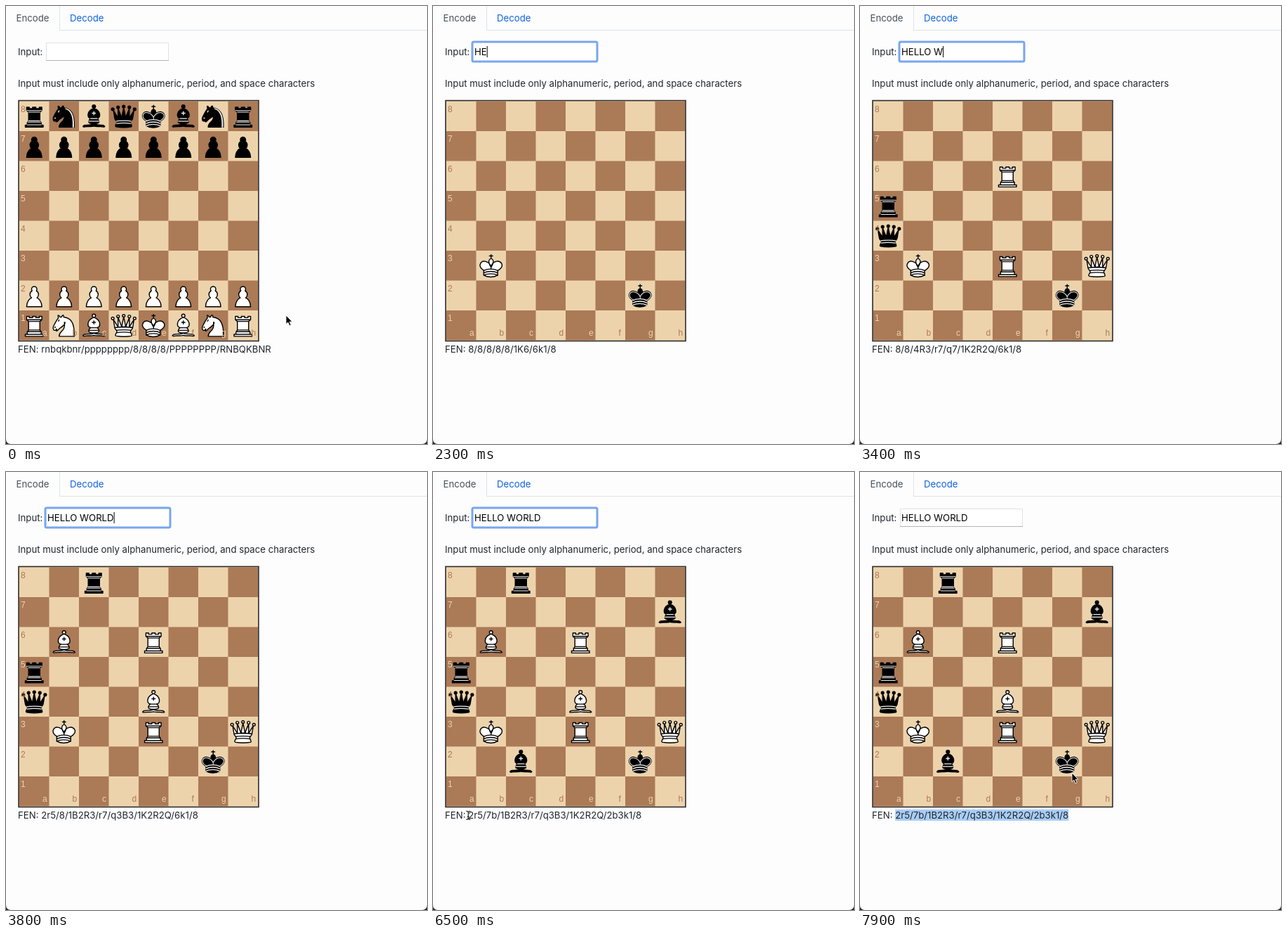
Recreate the animation shown at these times as an HTML page. Size 600 by 623 pixels, loop 8000 ms.

```html
<!DOCTYPE html>
<html lang="en">
<head>
<meta charset="utf-8">
<title>Encode</title>
<style>
  html, body { margin: 0; height: 100%; overflow: hidden; background: #fdfdfe; }
  svg { display: block; width: 100vw; height: 100vh; }
  text { font: 13.2px Inter, Roboto, sans-serif; fill: #212529; white-space: pre; }
  .label { font: 12px "Liberation Sans", sans-serif; }
  .piece { stroke: #000; stroke-width: 1.5; stroke-linecap: round; stroke-linejoin: round; }
</style>
</head>
<body>
<svg viewBox="0 0 600 623">
  <path d="M0 34.5H1M76 34.5H600M76.5 0V34" stroke="#dee2e6" fill="none"/>
  <text x="14.5" y="21.5" style="fill:#484f56">Encode</text>
  <text x="91" y="21.5" style="fill:#1062dc">Decode</text>
  <text x="17" y="70">Input:</text>
  <rect x="57.5" y="52.5" width="174" height="25" fill="#fff" stroke="#e2e2e4"/>
  <path d="M57 77.5H232" stroke="#b4b4b6"/>
  <rect id="ring" x="56" y="51" width="178" height="28" rx="2" fill="#fff" stroke="#78a6ee" stroke-width="3"/>
  <text id="typed" x="59" y="70" style="fill:#000"></text>
  <rect id="caret" y="57" width="1" height="16"/>
  <text x="17" y="114.5">Input must include only alphanumeric, period, and space characters</text>
  <rect x="18" y="134.5" width="342" height="342" fill="#edd3ac" stroke="#2c2c2c" stroke-width="1.6"/>
  <g id="squares"></g>
  <g id="pieces"></g>
  <g id="labels"></g>
  <rect id="mark" y="480" height="16" fill="#a8cdf8"/>
  <text id="fen" x="17" y="493"></text>
  <path d="M0 616Q0 623 7 623H0zM600 616Q600 623 593 623H600z" fill="#222"/>
  <path id="arrow" d="M0 0V12.6L2.9 10L5 14.8L7.2 13.8L5.1 9.2H9z" fill="#000" stroke="#fff" stroke-width=".9"/>
  <path id="beam" d="M-3-6Q0-6 0-4Q0-6 3-6M0-4V4M-3 6Q0 6 0 4Q0 6 3 6M-1.5 2H1.5" fill="none" stroke="#111" stroke-width="1.1"/>
</svg>
<script>
const $ = id => document.getElementById(id);
const LOOP = 8000, STEP = 100, CELL = 42.5, LEFT = 19, TOP = 135.5;
const LIGHT = '#edd3ac', DARK = '#ab7a57';

const dot = (x, y, r) => `M${x - r} ${y}a${r} ${r} 0 1 0 ${2 * r} 0a${r} ${r} 0 1 0 ${-2 * r} 0z`;

// body: outline; lines: inner strokes on both colours; light: strokes on black only; glow: light fill on black only
const SHAPES = {
  p: { body: 'M22.5 9c-2.21 0-4 1.79-4 4 0 .89.29 1.71.78 2.38C17.33 16.5 16 18.59 16 21c0 2.03.94 3.84 2.41 5.03-3 1.06-7.41 5.55-7.41 13.47h23c0-7.92-4.41-12.41-7.41-13.47 1.47-1.19 2.41-3 2.41-5.03 0-2.41-1.33-4.5-3.28-5.62.49-.67.78-1.49.78-2.38 0-2.21-1.79-4-4-4z' },
  r: {
    body: 'M9 39h27v-3H9zM12.5 32l1.5-2.5h17l1.5 2.5zM12 36v-4h21v4zM14 29.5v-13h17v13zM14 16.5L11 14h23l-3 2.5zM11 14V9h4v2h5V9h5v2h5V9h4v5z',
    light: 'M12 35.5h21M13 31.5h19M14 29.5h17M14 16.5h17M11 14h23'
  },
  n: {
    body: 'M22 10c10.5 1 16.5 8 16 29H15c0-9 10-6.5 8-21M24 18c.38 2.91-5.55 7.37-8 9-3 2-2.82 4.34-5 4-1.04-.94 1.41-3.04 0-3-1 0 .19 1.23-1 2-1 0-4 1-4-4 0-2 6-12 6-12s1.89-1.9 2-3.5c-.73-1-.5-2-.5-3 1-1 3 2.5 3 2.5h2s.78-2 2.5-3c1 0 1 3 1 3',
    lines: dot(9, 25.5, .4) + 'M15 14.5l-1 1.8',
    glow: 'M24.55 10.4l-.45 1.45.5.15c3.15 1 5.65 2.49 7.9 6.75S35.75 29.06 35.25 39l-.05.5h2.25l.05-.5c.5-10.06-.88-16.85-3.25-21.34-2.37-4.49-5.79-6.64-9.19-7.16z'
  },
  b: {
    body: 'M9 36c3.39-.97 10.11.43 13.5-2 3.39 2.43 10.11 1.03 13.5 2 0 0 1.65.54 3 2-.68.97-1.65.99-3 .5-3.39-.97-10.11.46-13.5-1-3.39 1.46-10.11.03-13.5 1-1.35.49-2.32.47-3-.5 1.35-1.94 3-2 3-2zM15 32c2.5 2.5 12.5 2.5 15 0 .5-1.5 0-2 0-2 0-2.5-2.5-4-2.5-4 5.5-1.5 6-11.5-5-15.5-11 4-10.5 14-5 15.5 0 0-2.5 1.5-2.5 4 0 0-.5.5 0 2z' + dot(22.5, 8, 2.5),
    lines: 'M17.5 26h10M15 30h15m-7.5-14.5v5M20 18h5'
  },
  q: {
    body: 'M9 26c8.5-1.5 21-1.5 27 0l2-12-7 11V11l-5.5 13.5-3-15-3 15-5.5-14V25L7 14zM9 26c0 2 1.5 2 2.5 4 1 1.5 1 1 .5 3.5-1.5 1-1.5 2.5-1.5 2.5-1.5 1.5.5 2.5.5 2.5 6.5 1 16.5 1 23 0 0 0 1.5-1 0-2.5 0 0 .5-1.5-1-2.5-.5-2.5-.5-2 .5-3.5 1-2 2.5-2 2.5-4-8.5-1.5-18.5-1.5-27 0z'
      + dot(6, 12, 2) + dot(14, 9, 2) + dot(22.5, 8, 2) + dot(31, 9, 2) + dot(39, 12, 2),
    lines: 'M11.5 30c3.5-1 18.5-1 22 0M12 33.5c6-1 15-1 21 0'
  },
  k: {
    body: 'M22.5 11.6V6M20 8h5M22.5 25s4.5-7.5 3-10.5c0 0-1-2.5-3-2.5s-3 2.5-3 2.5c-1.5 3 3 10.5 3 10.5M11.5 37c5.5 3.5 15.5 3.5 21 0v-7s9-4.5 6-10.5c-4-6.5-13.5-3.5-16 4V27v-3.5c-3.5-7.5-13-10.5-16-4-3 6 5 10 5 10z',
    lines: 'M11.5 30c5.5-3 15.5-3 21 0m-21 3.5c5.5-3 15.5-3 21 0m-21 3.5c5.5-3 15.5-3 21 0',
    light: 'M32 29.5s8.5-4 6-9.65C34.15 14 25 18 22.5 24.5v2.1-2.1C20 18 9.9 14 7 19.85c-2.5 5.65 4.85 9 4.85 9'
  }
};

const START = 'rnbqkbnr/pppppppp/8/8/8/8/PPPPPPPP/RNBQKBNR';
const PLACED = 'Kb3 kg2 Qh3 qa4 Re3 Re6 ra5 rc8 Be4 Bb6 bh7 bc2'.split(' ');
const TEXT = 'HELLO WORLD';
const KEYS = [1900, 2200, 2500, 2800, 2900, 3200, 3300, 3500, 3600, 3700, 3800];
const FOCUS = 1500, BLUR = 6600;

// time, x, y of the pointer
const PATH = [
  [0, 399, 440], [100, 399, 440], [900, 112, 78], [1100, 108, 76], [4700, 108, 76],
  [5400, 101, 452], [5700, 88, 492], [6000, 62, 501], [6300, 51, 489], [6600, 50, 488],
  [7300, 308, 490], [7500, 310, 491], [7700, 309, 489], [7899, 309, 489], [7900, 302, 428], [8000, 302, 428]
];

function pointer(t) {
  const i = PATH.findIndex(p => p[0] > t);
  const [a, b] = [PATH[i - 1], PATH[i]];
  const u = (t - a[0]) / (b[0] - a[0]), e = u * u * (3 - 2 * u);
  return [a[1] + (b[1] - a[1]) * e, a[2] + (b[2] - a[2]) * e];
}

function fenOf(list) {
  const at = Object.fromEntries(list.map(p => [p.slice(1), p[0]]));
  return [...'87654321'].map(rank =>
    [...'abcdefgh'].map(file => at[file + rank] || 1).join('').replace(/1+/g, run => run.length)
  ).join('/');
}

function drawPiece(c, col, row) {
  const s = SHAPES[c.toLowerCase()], black = c === c.toLowerCase();
  const ink = black ? '#eee' : '#000';
  const stroke = (d, w) => d ? `<path d="${d}" fill="none" stroke="${ink}" stroke-width="${w}"/>` : '';
  return `<g class="piece" transform="translate(${LEFT + col * CELL} ${TOP + row * CELL}) scale(${CELL / 45})">
    <path d="${s.body}" fill="${black ? '#000' : '#fff'}"/>${stroke(s.lines, 1.4)}` +
    (black ? stroke(s.light, 1.1) + (s.glow ? `<path d="${s.glow}" fill="${ink}" stroke="none"/>` : '') : '') + '</g>';
}

function drawBoard(fen) {
  $('fen').textContent = 'FEN: ' + fen;
  $('pieces').innerHTML = fen.split('/').map((line, row) =>
    [...line.replace(/\d/g, n => ' '.repeat(n))].map((c, col) => c === ' ' ? '' : drawPiece(c, col, row)).join('')
  ).join('');
}

for (let i = 0; i < 64; i++) {
  const col = i % 8, row = i >> 3;
  if ((col + row) % 2) $('squares').innerHTML +=
    `<rect x="${LEFT + col * CELL}" y="${TOP + row * CELL}" width="${CELL}" height="${CELL}" fill="${DARK}"/>`;
}
for (let i = 0; i < 8; i++) {
  const label = (x, y, s, fill) => `<text class="label" x="${x}" y="${y}" style="fill:${fill}">${s}</text>`;
  $('labels').innerHTML +=
    label(21, TOP + i * CELL + 15, 8 - i, i % 2 ? LIGHT : DARK) +
    label(LEFT + i * CELL + 33, 469, 'abcdefgh'[i], i % 2 ? DARK : LIGHT);
}

const show = (id, on) => $(id).style.display = on ? '' : 'none';
let shown;

function render(t) {
  const count = KEYS.filter(k => k <= t).length;
  const placed = KEYS.filter(k => k + STEP <= t).length;
  const fen = placed ? fenOf(PLACED.slice(0, placed === TEXT.length ? 12 : placed)) : START;
  if (fen !== shown) drawBoard(shown = fen);

  const focused = t >= FOCUS && t < BLUR;
  show('ring', focused);
  $('typed').textContent = TEXT.slice(0, count);
  const since = t - (count ? KEYS[count - 1] : FOCUS);
  show('caret', focused && since % 1000 < 500);
  $('caret').setAttribute('x', 59 + (count ? $('typed').getComputedTextLength() : 0));

  const [x, y] = pointer(t), visible = t < 1900 || t >= 4800;
  const overText = y < 120 || y > 478;
  show('beam', visible && overText);
  show('arrow', visible && !overText);
  for (const id of ['beam', 'arrow']) $(id).setAttribute('transform', `translate(${x} ${y})`);

  // selection grows by whole characters
  const line = $('fen'), from = 17 + line.getSubStringLength(0, 5);
  let width = 0;
  if (t >= BLUR) for (let n = 1; n <= fen.length; n++) {
    const w = line.getSubStringLength(5, n);
    if (from + w - 4 < x || t >= 7300) width = w;
  }
  $('mark').setAttribute('x', from);
  $('mark').setAttribute('width', width);
}

const began = performance.now();
function tick() {
  const t = (performance.now() - began) % LOOP;
  render(Math.floor(t / STEP) * STEP);
  requestAnimationFrame(tick);
}
tick();
</script>
</body>
</html>
```
